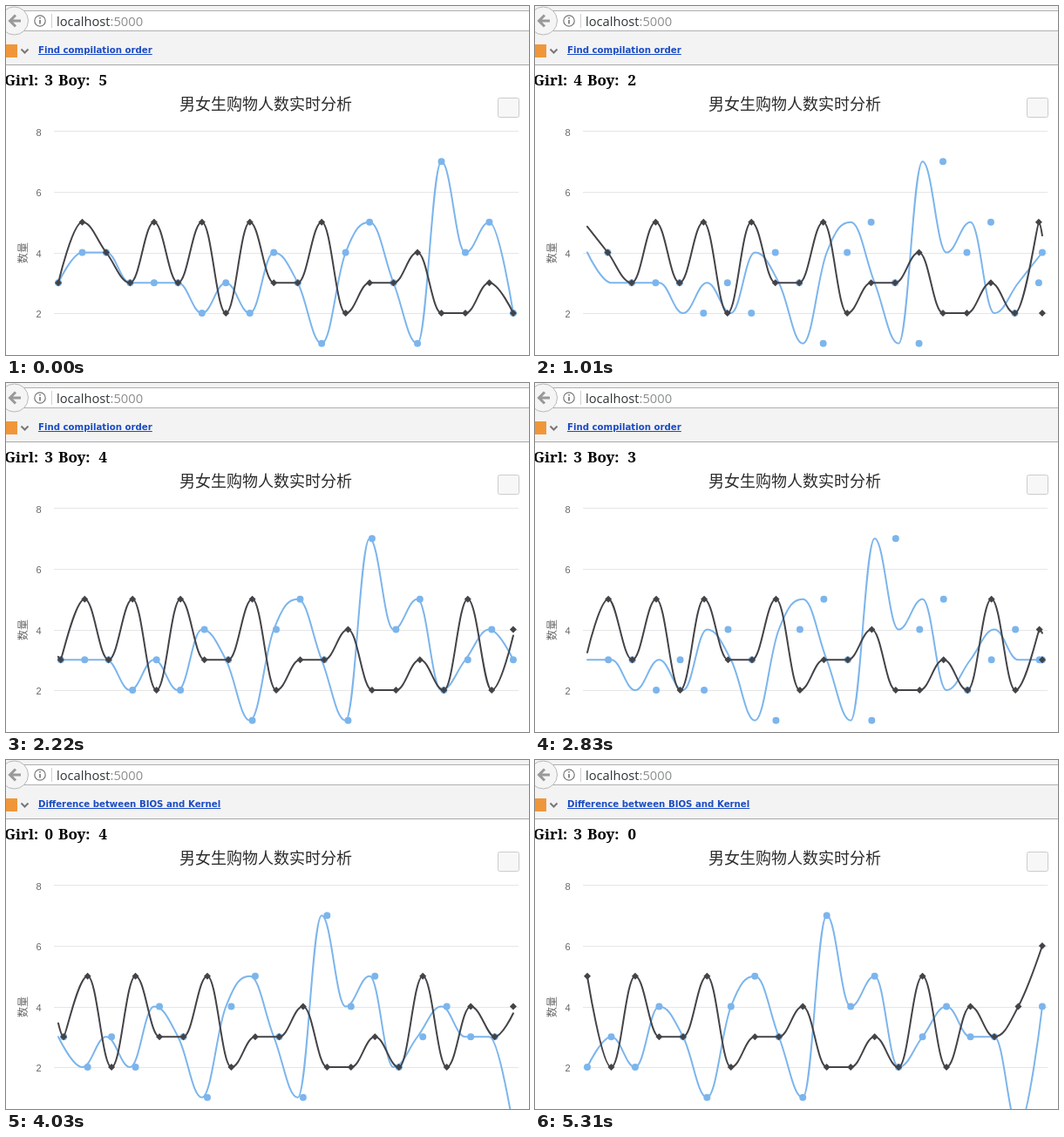
Write an HTML page that moves like this. It is 600 px wide and 400 px high and loops after 5540 ms.

```html
<!DOCTYPE html>
<html lang="zh">
<head>
<meta charset="utf-8">
<title>Live chart</title>
<style>
  html, body { margin: 0; width: 100%; height: 100%; overflow: hidden; background: #fff; }
  svg { display: block; width: 600px; height: 400px; }
  .url { font: 14.7px "Open Sans", sans-serif; fill: #2e3436; }
  .bookmark { font: bold 10.2px "DejaVu Sans", sans-serif; fill: #1a4bc4; text-decoration: underline; }
  .count { font: bold 17px "Noto Serif", serif; }
  .title { font: 18px "Noto Sans CJK SC", "Noto Sans CJK", sans-serif; fill: #2b2b2b; text-anchor: middle; }
  .axis { font: 11px "Liberation Sans", Arial, sans-serif; fill: #666; text-anchor: end; }
  .axis-title { font: 12px "Noto Sans CJK SC", "Noto Sans CJK", sans-serif; fill: #666; text-anchor: middle; }
  .line { fill: none; stroke-width: 2; stroke-linejoin: round; stroke-linecap: round; }
</style>
</head>
<body>
<svg viewBox="0 0 600 400">
  <!-- browser bars -->
  <rect width="600" height="68" fill="#f3f3f3"/>
  <rect x="-5" y="5.5" width="610" height="23" fill="#fff" stroke="#b0b0b0"/>
  <path d="M0 67.5H600" stroke="#a9a9a9"/>
  <circle cx="9.5" cy="17" r="16" fill="#f5f5f5" stroke="#b8b8b8"/>
  <path d="M17 17H5M11 10.5L4.500 17L11 23.500" fill="none" stroke="#999" stroke-width="3"/>
  <circle cx="39" cy="17" r="6.200" fill="none" stroke="#777" stroke-width="1.200"/>
  <path d="M39 16V20.500M39 13V14.600" stroke="#666" stroke-width="1.500"/>
  <path d="M52.500 9V25" stroke="#d0d0d0"/>
  <text class="url" x="58" y="23">localhost<tspan fill="#8b8e8f">:5000</tspan></text>
  <rect x="-2" y="44" width="15" height="15" fill="#f0963a"/>
  <path d="M17.500 49.500L21.500 53.500L25.500 49.500" fill="none" stroke="#777" stroke-width="2"/>
  <text class="bookmark" id="bookmark" x="37" y="54"></text>

  <text class="count" y="91"><tspan x="-2">Girl:</tspan><tspan x="44.5" id="girlCount"></tspan><tspan x="60">Boy:</tspan><tspan x="106.5" id="boyCount"></tspan></text>

  <!-- chart -->
  <text class="title" x="298" y="119">男女生购物人数实时分析</text>
  <rect x="564.5" y="105.5" width="24" height="22" rx="2" fill="#f7f7f7" stroke="#ccc"/>
  <path d="M55 143.500H588M55 213.500H588M55 283.500H588M55 352.500H588" stroke="#e6e6e6"/>
  <g class="axis">
    <text x="40.5" y="149">8</text><text x="40.5" y="218">6</text>
    <text x="40.5" y="288">4</text><text x="40.5" y="357">2</text>
  </g>
  <text class="axis-title" transform="translate(24 283) rotate(-90)">数量</text>
  <path class="line" id="girlLine" stroke="#7cb5ec"/>
  <path id="girlMarks" fill="#7cb5ec"/>
  <path class="line" id="boyLine" stroke="#434348"/>
  <path id="boyMarks" fill="#434348"/>
</svg>
<script>
const LOOP = 5540, SIZE = 20, STEP = 27.47, EASE_MS = 500;
const girls = [..."34433323243145317452343304"].map(Number);
const boys = [..."35435352533523342232524346"].map(Number);

// Each shift: first and last redraw, number of redraws, time already eased at the first one
const shifts = [
  [50, 500, 11, 80], [920, 1410, 12, 36], [1860, 2320, 10, 39],
  [2790, 3240, 12, 72], [3720, 4190, 12, 44], [4620, 5080, 12, 40]
];
const counts = [
  [0, 3, 5], [670, 4, 2], [1580, 3, 4], [2550, 3, 3], [3450, 0, 4], [4400, 4, 6], [5310, 3, 0]
];
const BOOKMARK_CHANGE = 3720;

const $ = id => document.getElementById(id);
const xAt = i => 60 + STEP * i;
const yAt = value => 421.5 - 34.75 * value;
const mix = (a, b, p) => a + (b - a) * p;
const setText = (id, text) => { if ($(id).textContent !== String(text)) $(id).textContent = text; };

const pointsFrom = (data, start) =>
  data.slice(start, start + SIZE).map((v, i) => [xAt(i), yAt(v)]);

// Smoothed tangent handles that never overshoot the neighbouring points
function handles(prev, point, next) {
  const [x, y] = point;
  if (!prev || !next) return [point, point];
  const lx = (1.5 * x + prev[0]) / 2.5, rx = (1.5 * x + next[0]) / 2.5;
  let ly = (1.5 * y + prev[1]) / 2.5, ry = (1.5 * y + next[1]) / 2.5;
  const fix = (ry - ly) * (rx - x) / (rx - lx) + y - ry;
  ly += fix;
  ry += fix;
  const clamp = (v, end) => Math.min(Math.max(v, Math.min(end, y)), Math.max(end, y));
  if (clamp(ly, prev[1]) !== ly) { ly = clamp(ly, prev[1]); ry = 2 * y - ly; }
  if (clamp(ry, next[1]) !== ry) { ry = clamp(ry, next[1]); ly = 2 * y - ry; }
  return [[lx, ly], [rx, ry]];
}

const still = point => [...point, ...point, ...point];

function spline(points) {
  const hs = points.map((p, i) => handles(points[i - 1], p, points[i + 1]));
  return points.map((p, i) => i ? [...hs[i - 1][1], ...hs[i][0], ...p] : still(p));
}

const toPath = segments =>
  segments.map((s, i) => i ? "C" + s.join(" ") : "M" + s.slice(4).join(" ")).join("");

// The line slides left while its two ends stay on the edges of the plot
function slidingLine(before, after, p) {
  const from = [...spline(before), still(before[SIZE - 1])];
  const to = [still(after[0]), ...spline(after)];
  return from.map((seg, i) => seg.map((v, k) => mix(v, to[i][k], p)));
}

const circle = (x, y) => `M${x - 4} ${y}a4 4 0 1 0 8 0a4 4 0 1 0 -8 0z`;
const diamond = (x, y) => `M${x} ${y - 4}l4 4l-4 4l-4 -4z`;
const markers = (points, shape, p) =>
  points.map(([x, y], i) => shape(i < SIZE - 1 ? x + STEP * (1 - p) : x, y)).join("");

function chartState(t) {
  const n = shifts.filter(s => t >= s[0]).length;
  if (!n) return [0, 1];
  const [first, last, redraws, lead] = shifts[n - 1];
  if (t >= last) return [n, 1];
  const tick = (last - first) / (redraws - 1);
  const elapsed = Math.floor((t - first) / tick + 0.01) * tick + lead;
  return [n, (1 - Math.cos(Math.PI * Math.min(elapsed / EASE_MS, 1))) / 2];
}

function draw(t) {
  const [n, p] = chartState(t);
  const girl = pointsFrom(girls, n), boy = pointsFrom(boys, n);
  $("girlLine").setAttribute("d", toPath(spline(girl)));
  $("girlMarks").setAttribute("d", markers(girl, circle, p));
  const boyLine = p < 1 ? slidingLine(pointsFrom(boys, n - 1), boy, p) : spline(boy);
  $("boyLine").setAttribute("d", toPath(boyLine));
  $("boyMarks").setAttribute("d", markers(boy, diamond, p));

  const [, girlCount, boyCount] = counts.filter(c => t >= c[0]).pop();
  setText("girlCount", girlCount);
  setText("boyCount", boyCount);
  setText("bookmark", t < BOOKMARK_CHANGE ? "Find compilation order" : "Difference between BIOS and Kernel");
}

const startTime = performance.now();
function frame() {
  draw((performance.now() - startTime) % LOOP);
  requestAnimationFrame(frame);
}
frame();
</script>
</body>
</html>
```
